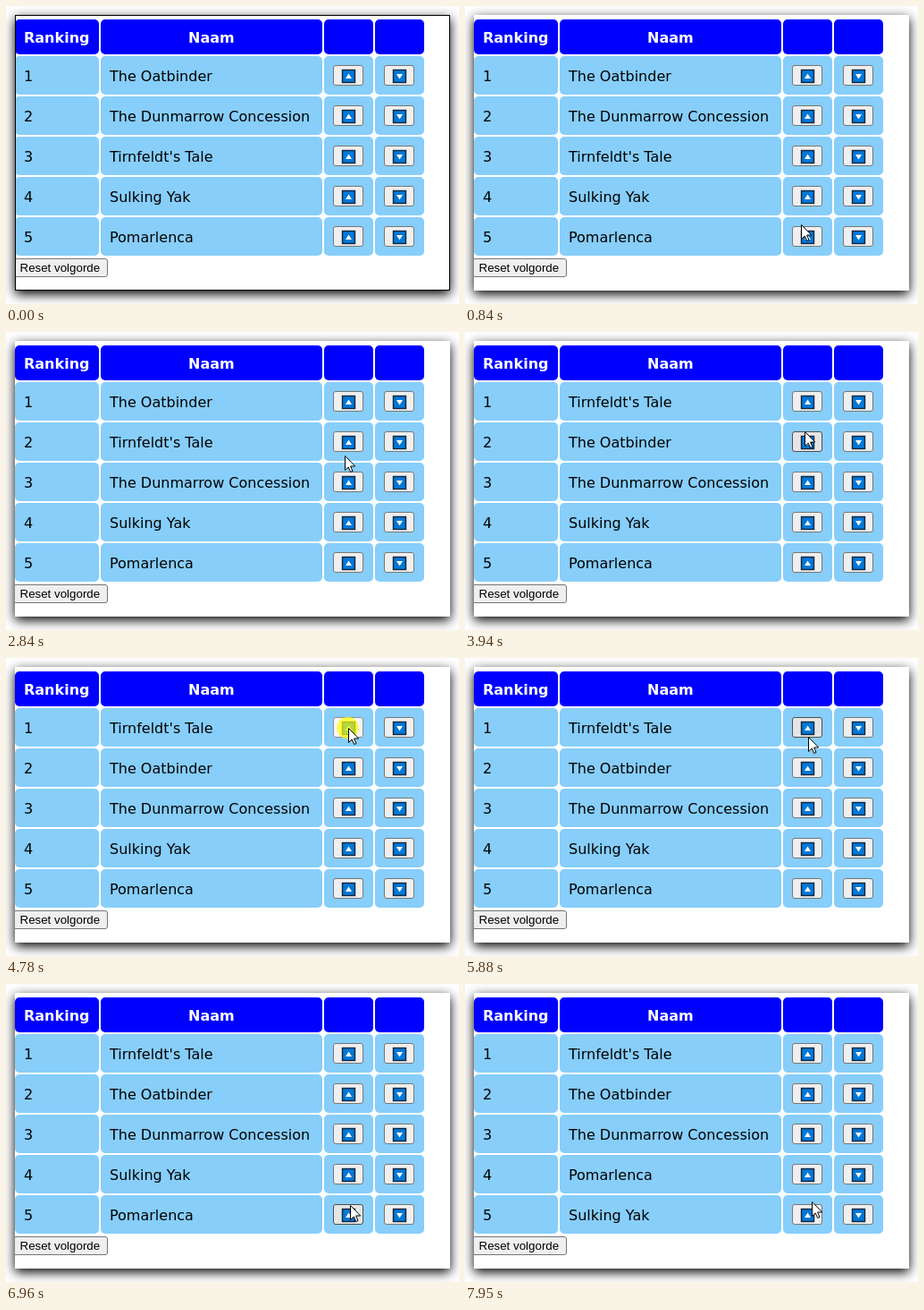
These frames come from a looping animation (507x333 px, 8 s). An HTML page:

```html
<!DOCTYPE html>
<html lang="nl">
<head>
<meta charset="utf-8">
<title>Ranking</title>
<style>
  html, body { margin: 0; width: 100%; height: 100%; overflow: hidden; background: #fff; }
  #panel { position: absolute; left: 10px; top: 10px; width: 487px; height: 308px;
           background: #fff; box-shadow: 0 4px 12px #000; }
  svg { display: block; overflow: hidden; }
  text { font: 16px "DejaVu Sans", Verdana, sans-serif; white-space: pre; }
  .head { font-weight: bold; fill: #fff; }
  .small { font: 13.333px "Liberation Sans", Arial, sans-serif; }
  .button { fill: #efefef; stroke: #767676; }
  .hover { fill: #e5e5e5; stroke: #4f4f4f; }
  .active { fill: #f5f5f5; stroke: #8d8d8d; }
</style>
</head>
<body>
<div id="panel"><svg id="stage" width="487" height="308" viewBox="10 10 487 308"></svg></div>
<script>
const LOOP = 8000, ENTER = 680;
const stage = document.getElementById('stage');
const films = ['The Oatbinder', 'The Dunmarrow Concession', "Tirnfeldt's Tale", 'Sulking Yak', 'Pomarlenca'];
const rowTop = i => 56 + 45 * i;

// press, release, row whose up button is clicked
const clicks = [
  [1980, 2150, 2], [3300, 3470, 1], [4550, 4630, 0],
  [4780, 4860, 0], [5010, 5180, 0], [7340, 7490, 4]
];

// pointer moves: start, end, x and y reached
const entry = [336, 292];
const moves = [
  [ENTER, 1100, 400, 214], [1100, 1450, 374, 162], [1500, 1780, 379, 167],
  [2540, 3220, 379, 125], [3880, 4250, 383, 78],
  [5850, 6650, 398, 207], [6650, 7110, 383, 252], [7900, 7950, 388, 243]
];

function add(name, attrs, text = '') {
  const node = document.createElementNS('http://www.w3.org/2000/svg', name);
  for (const key in attrs) node.setAttribute(key, attrs[key]);
  node.textContent = text;
  return stage.appendChild(node);
}

const label = (x, y, text, cls = '') => add('text', { x, y, class: cls }, text);
const box = (x, y, width, height, attrs) => add('rect', { x, y, width, height, ...attrs });
const button = (x, y, w, h) => box(x + .5, y + .5, w - 1, h - 1, { rx: 2.5, class: 'button' });
const show = (node, on) => node.setAttribute('visibility', on ? 'visible' : 'hidden');

function cells(y, height, fill) {
  let x = 10;
  for (const width of [94, 248, 55, 55]) {
    box(x, y, width, height, { rx: 5, fill });
    x += width + 2;
  }
}

function arrowButton(x, y, up) {
  const node = button(x, y, 34, 23);
  const cx = x + 17.5, cy = y + 12.5, d = up ? 1 : -1;
  box(cx - 7, cy - 7, 14, 14, { fill: '#0078d7', stroke: '#10263c', 'stroke-width': 1.4 });
  add('path', { d: `M${cx - 3.5} ${cy + 2.5 * d}h7l-3.5 ${-5.5 * d}z`, fill: '#fff' });
  return node;
}

cells(15, 39, '#00f');
label(20, 41, 'Ranking', 'head');
label(204, 41, 'Naam', 'head');

const rows = films.map((film, i) => {
  const y = rowTop(i);
  cells(y, 43, '#87cefa');
  label(20, y + 28, i + 1);
  const name = label(116, y + 28, film);
  const up = arrowButton(366, y + 10, true);
  arrowButton(423, y + 10, false);
  return { name, up };
});

button(8, 282, 106, 21);
label(15.5, 297, 'Reset volgorde', 'small');

const halo = add('circle', { r: 12.2, fill: '#ff0', 'fill-opacity': .7 });
const pointer = add('path', {
  d: 'M.5 .5V16.5L4.2 13L6.7 18.5L9 17.5L6.6 12H11.7Z',
  fill: '#fff', stroke: '#000'
});
const frame = box(10.5, 10.5, 486, 307, { fill: 'none', stroke: '#000' });

function tipAt(t) {
  let [x, y] = entry;
  for (const [start, end, toX, toY] of moves) {
    const k = Math.min(1, Math.max(0, (t - start) / (end - start)));
    const eased = k * (2 - k);
    x += (toX - x) * eased;
    y += (toY - y) * eased;
  }
  return [Math.round(x), Math.round(y)];
}

function draw(t) {
  const [x, y] = tipAt(t);
  const visible = t >= ENTER;
  const pressed = clicks.some(([down, up]) => t >= down && t < up);

  const order = films.slice();
  for (const [, up, row] of clicks) {
    if (t >= up && row > 0) order.splice(row - 1, 0, ...order.splice(row, 1));
  }
  rows.forEach(({ name, up }, i) => {
    if (name.textContent !== order[i]) name.textContent = order[i];
    const dy = y - rowTop(i) - 10;
    const over = visible && x >= 366 && x < 400 && dy >= 0 && dy < 23;
    up.setAttribute('class', 'button' + (over ? pressed ? ' active' : ' hover' : ''));
  });

  show(frame, t < 70);
  show(pointer, visible);
  show(halo, pressed);
  pointer.setAttribute('transform', `translate(${x} ${y})`);
  halo.setAttribute('cx', x - .5);
  halo.setAttribute('cy', y);
}

const start = performance.now();
function tick() {
  draw((performance.now() - start) % LOOP);
  requestAnimationFrame(tick);
}
tick();
</script>
</body>
</html>
```
